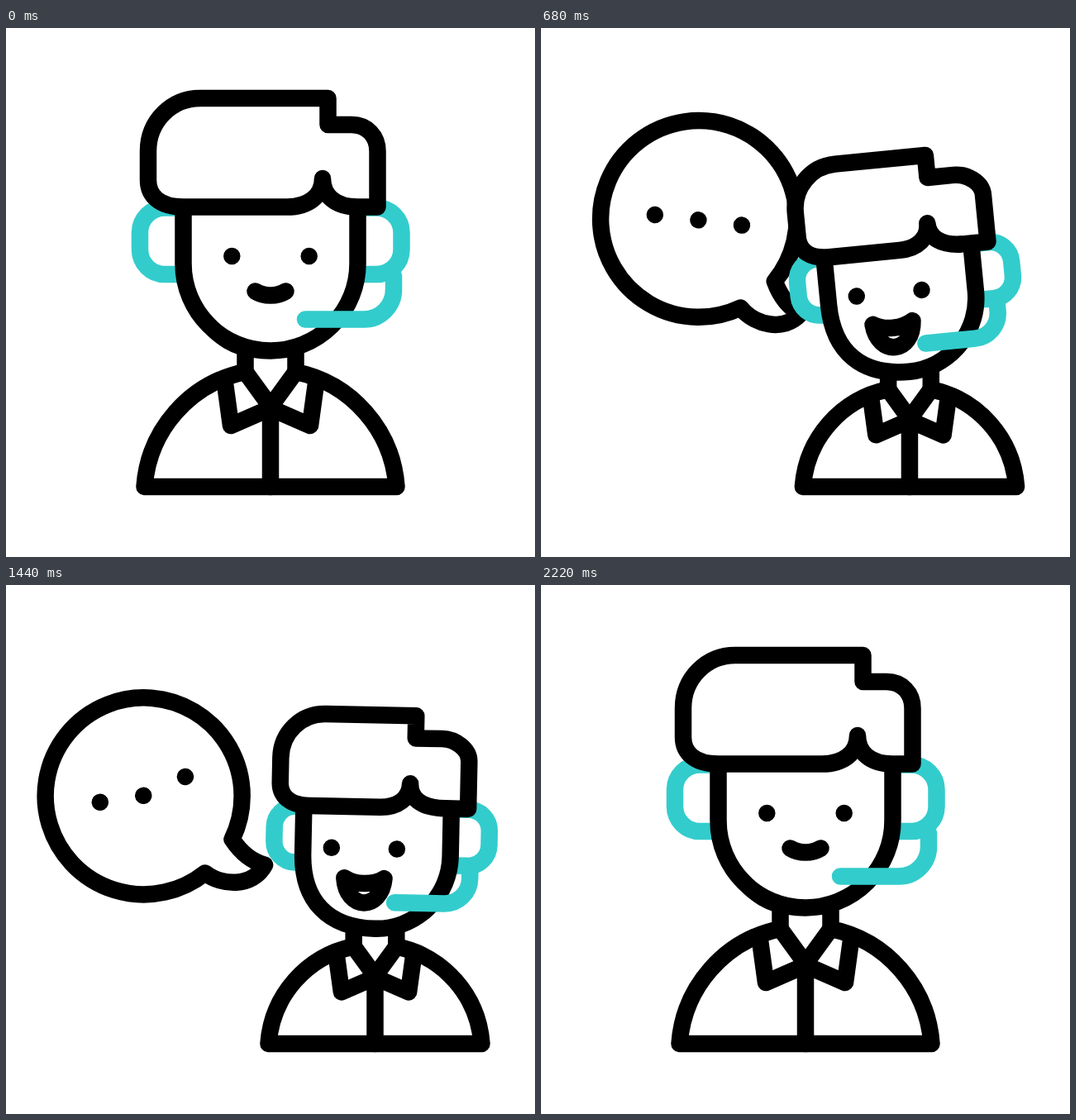
Write an HTML page that moves like this. It is 640 by 640 pixels and loops after 2400 ms.

```html
<!DOCTYPE html>
<html lang="en">
<head>
<meta charset="utf-8">
<title>Support agent</title>
<style>
  html, body { margin: 0; height: 100%; overflow: hidden; background: #fff; }
  svg { display: block; width: 100vw; height: 100vh; }
  path {
    fill: #fff; stroke: #000; stroke-width: 20.5;
    stroke-linecap: round; stroke-linejoin: round;
    vector-effect: non-scaling-stroke;
  }
  .line { fill: none; }
  .teal { stroke: #3cc; }
</style>
</head>
<body>
<svg viewBox="0 0 640 640">
  <g id="bubble">
    <path d="M-5.8 -37.2A119 119 0 1 0 -43 -.4C-25 17 12 24 30 -2C14 -8 3 -20 -5.8 -37.2Z"/>
    <path id="dots" class="line"/>
  </g>
  <g id="agent">
    <g class="head">
      <path id="earL" class="teal" d="M214 217.5H192A30 30 0 0 0 162 247.5V268A30 30 0 0 0 192 298H214"/>
      <path id="earR" class="teal" d="M426 217.5H448A30 30 0 0 1 478.5 247.5V268A30 30 0 0 1 448 298H426"/>
    </g>
    <path d="M289.5 385V416A153 153 0 0 0 167.5 555H472.5A153 153 0 0 0 350.5 416V385"/>
    <path class="line" d="M289.5 416L320 458L350.5 416M265 430L272 481L320 460L368 481L375 430M320 458V555"/>
    <g class="head">
      <path id="jaw"/>
      <path id="hair"/>
      <path id="eyes" class="line" d="M273.3 276h.01M366.7 276h.01"/>
      <path id="mouth"/>
      <path id="mic" class="teal line" d="M362 352.5H433A36 36 0 0 0 469 316.5V300"/>
    </g>
  </g>
</svg>
<script>
  const LOOP = 2400;
  const $ = id => document.getElementById(id);
  const heads = document.querySelectorAll('.head');
  const set = (id, name, value) => $(id).setAttribute(name, value);
  const smooth = x => x * x * (3 - 2 * x);
  const mix = (a, b, p) => a + (b - a) * p;

  // Eased value at time t from [time, value] keys
  function track(t, ...keys) {
    if (t <= keys[0][0]) return keys[0][1];
    for (let i = 1; i < keys.length; i++) {
      const [t0, a] = keys[i - 1], [t1, b] = keys[i];
      if (t < t1) return mix(a, b, smooth((t - t0) / (t1 - t0)));
    }
    return keys[keys.length - 1][1];
  }

  function drawBubble(t, p) {
    const y = track(t, [200, 300], [540, 344], [1700, 344], [2200, 300]);
    const angle = track(t, [200, -49], [620, 7.4], [1200, -11.2], [1700, -1.3], [2200, -49]);
    set('bubble', 'transform',
      `translate(${mix(408, 283.5, p)} ${y}) rotate(${angle}) scale(${mix(.675, 1, p)})`);
    set('dots', 'd', [0, 1, 2].map(i => {
      const start = 700 + 200 * i;
      const lift = track(t, [start, 0], [start + 300, 20], [start + 600, 0]);
      return `M${-106.4 + 53 * (i - 1)} ${-99.9 - lift}h.01`;
    }).join(''));
  }

  function drawHead(t, p) {
    const tilt = track(t, [200, 0], [700, -5.6], [1200, 7], [1700, -5.3], [2200, 0]);
    heads.forEach(h => h.setAttribute('transform', `rotate(${tilt} 320 394)`));

    const shifts = { earL: 11, earR: 2, eyes: -18, mouth: -17, mic: -15 };
    for (const id in shifts) set(id, 'transform', `translate(${shifts[id] * p} 0)`);

    const k = mix(.552, .64, p) * 105.5;
    set('jaw', 'd', `M214.5 217V285C214.5 ${285 + k} ${320 - k} 390.5 320 390.5
      A105.5 105.5 0 0 0 425.5 285V217`);

    // The left edge and the curl slide separately as the head turns
    const l = x => x + 8 * p, c = x => x - 17 * p, r = x => x - 8 * p;
    set('hair', 'd', `M${l(235)} 85H${c(389.5)}V117H${r(418)}
      C${r(437)} 117 449.5 131 449.5 149V216.5H${r(425)}
      C${c(399)} 216.5 ${c(383)} 203 ${c(383)} 182
      C${c(383)} 203 ${c(366)} 216.5 ${c(340)} 216.5H${l(214)}
      C${l(186)} 216.5 ${l(172)} 203 ${l(172)} 184V149
      C${l(172)} 113 ${l(200)} 85 ${l(235)} 85Z`);

    const w = mix(18.5, 28.5, p), sag = 318.5 + mix(6.7, 10, p);
    const drop = 318.5 + mix(6.7, 47, p), bw = mix(8, 25, p), top = mix(8, 13, p);
    set('mouth', 'd', `M${320 - w} 318.5C${320 - top} ${sag} ${320 + top} ${sag} ${320 + w} 318.5
      C${320 + bw} ${drop} ${320 - bw} ${drop} ${320 - w} 318.5Z`);
  }

  function frame() {
    const t = performance.now() % LOOP;
    const p = track(t, [200, 0], [700, 1], [1700, 1], [2200, 0]);
    set('agent', 'transform',
      `translate(${320 + 126.5 * p} 555) scale(${1 - .154 * p}) translate(-320 -555)`);
    drawBubble(t, p);
    drawHead(t, p);
    requestAnimationFrame(frame);
  }
  frame();
</script>
</body>
</html>
```
